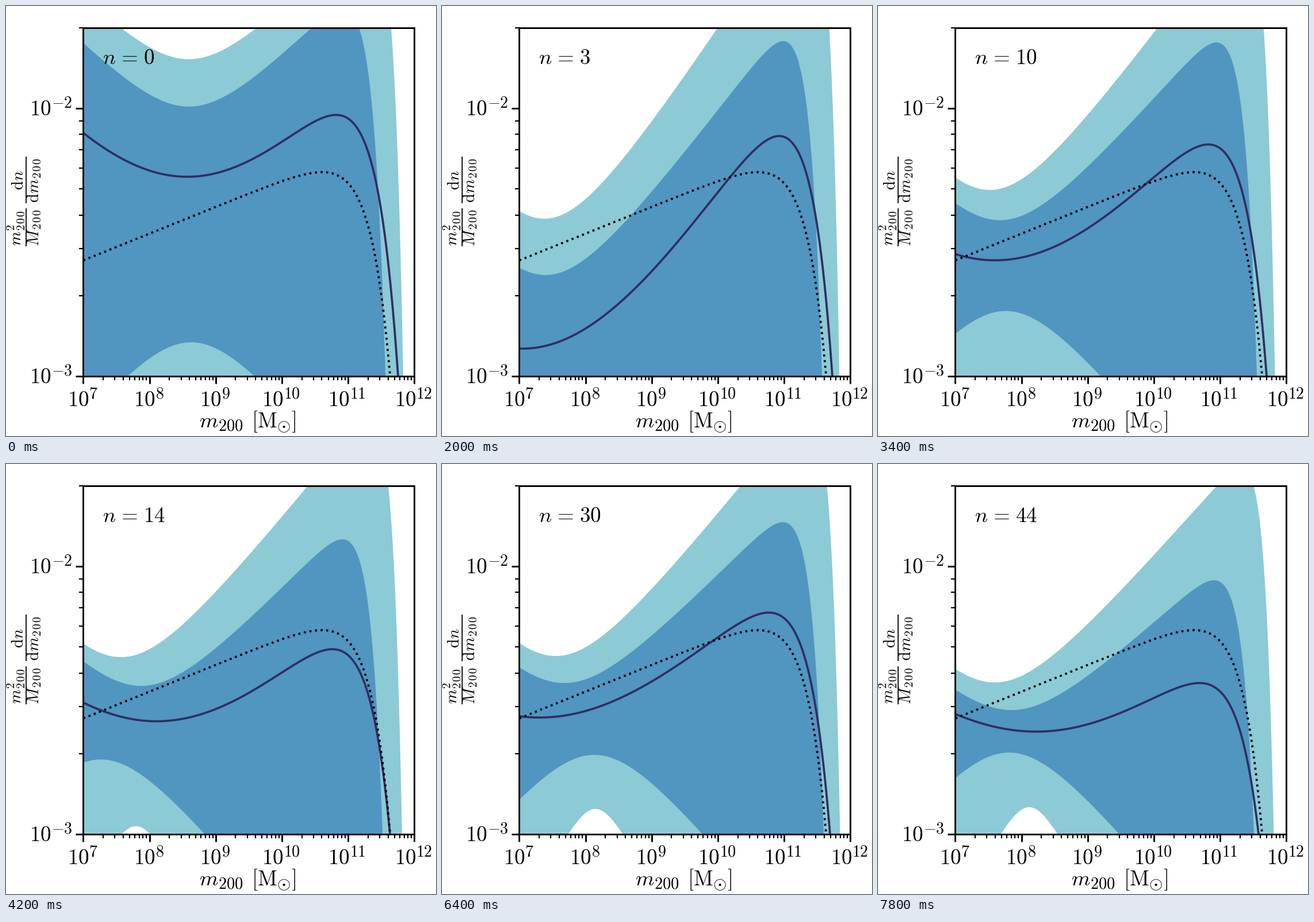
A matplotlib script for the animation above (8 s loop, 748 by 748 pixels).

```python
import numpy as np
import matplotlib.pyplot as plt
from matplotlib.animation import FuncAnimation
from matplotlib.patches import Polygon, Rectangle

SIZE = 748
FRAMES = 40
HOLD = 7                     # last step that still shows n = 0
PT = 0.72                    # points per pixel at 100 dpi
LEFT, RIGHT, TOP, BOTTOM = 134.4, 710.4, 38.2, 643.7
DEC_X = (RIGHT - LEFT) / 5
DEC_Y = (BOTTOM - TOP) / np.log10(20)
LIGHT, DARK, LINE = "#8ccad5", "#5195c1", "#302e62"
XS = np.linspace(LEFT, 700, 900)

plt.rcParams["mathtext.fontset"] = "cm"
fig = plt.figure(figsize=(SIZE / 100, SIZE / 100), dpi=100, facecolor="white")
ax = fig.add_axes([0, 0, 1, 1])
ax.set(xlim=(0, SIZE), ylim=(SIZE, 0))
ax.axis("off")


# --- Curve rules -----------------------------------------------------------
def bend(x, center, width):
    """Hyperbola: flat at the center, slope one far away from it."""
    return np.hypot(x - center, width) - width


def rise(x, center, level, slope, width, edge, rate):
    """Valley that climbs to the right and is cut off exponentially at edge."""
    def base(v):
        return level - slope * bend(v, center, width)
    cut = (BOTTOM - base(edge)) * np.exp(rate * (x - edge))
    return np.minimum(base(x) + cut, 800)


def hump(x, center, level, slope, width):
    return np.minimum(level + slope * bend(x, center, width), 800)


# Per step: valley x, valley y, slope (and right edge) of each rising curve,
# then the tops of the two lower humps.
steps, states = [], []


def state(step, median, inner, outer, low, gap=(226, 680)):
    steps.append(step)
    states.append(median + inner + outer + low + gap)


state(HOLD, (315, 297, 1.52, 682), (318, 175, 1.04, 660), (318, 92.5, 1.03),
      (322, 585))
state(10, (140, 596, 1.8, 679), (180, 468, 1.35, 661), (178, 370, 1.55),
      (290, 690))
state(14, (160, 438.5, 1.47, 682), (195, 362.5, 1.24, 662), (190, 308, 1.46),
      (265, 543))
state(21, (262, 447.5, 1.25, 668), (235, 386, 1.06, 655), (200, 336, 1.26),
      (165, 514), (226, 630))
state(32, (170, 441, 1.09, 675), (213, 381, 1.04, 664), (198, 334, 1.27),
      (265, 506), (267, 600))
state(39, (275, 465.5, 0.98, 662), (232, 428, 0.93, 654), (203, 380, 1.16),
      (228, 502), (263, 597))


def curves(i):
    p = [np.interp(i, steps, column) for column in zip(*states)]
    median, inner, outer, low, gap = p[:4], p[4:8], p[8:11], p[11:13], p[13:]
    outer_edge = 690.5 + 0.4 * (inner[3] - 659)
    return (rise(XS, *median[:3], 300, median[3], 0.0255),
            rise(XS, *inner[:3], 105, inner[3], 0.048),
            rise(XS, *outer, 105, outer_edge, 0.065),
            hump(XS, *low, 1.25, 105),
            hump(XS, *gap, 2, 40))


def band(upper, lower):
    return np.column_stack([np.r_[XS, XS[::-1]], np.r_[upper, lower[::-1]]])


# --- Drawing helpers -------------------------------------------------------
def label(x, y, tex, size, rotation=0):
    return ax.text(x, y, f"${tex}$", fontsize=size * PT, rotation=rotation,
                   ha="left", va="baseline", rotation_mode="anchor", zorder=6)


def stroke(xs, ys, width, color="black", **style):
    return ax.plot(xs, ys, color=color, lw=width * PT, **style)[0]


def power(x, y, exponent):
    label(x, y, "10", 37)
    label(x + 37.5, y - 13.4, exponent, 28)


def tick(x, y, dx, dy, major):
    length, width = (13, 2.9) if major else (7.4, 2.2)
    stroke([x, x + dx * length], [y, y + dy * length], width,
           solid_capstyle="butt", zorder=5)


# --- Frame, ticks and tick labels ------------------------------------------
frame = Rectangle((LEFT, TOP), RIGHT - LEFT, BOTTOM - TOP, fill=False,
                  ec="black", lw=2.9 * PT, zorder=5)
ax.add_patch(frame)
for d in range(6):
    x = LEFT + d * DEC_X
    tick(x, BOTTOM, 0, 1, True)
    power(x - 27.4 - 7.4 * (d > 2), 696, str(7 + d))
    for m in range(2, 10 if d < 5 else 2):
        tick(x + DEC_X * np.log10(m), BOTTOM, 0, 1, False)
for d in range(2):
    y = BOTTOM - d * DEC_Y
    tick(LEFT, y, -1, 0, True)
    power(41.5, y + 12, f"-{3 - d}")
    for m in range(2, 10 if d == 0 else 3):
        tick(LEFT, y - DEC_Y * np.log10(m), -1, 0, False)

# Horizontal axis title
for x, y, tex, size in [
        (336, 733, "m", 37), (369, 738.5, "200", 28.5), (427, 733, "[", 37),
        (437.5, 733, r"\mathrm{M}", 37), (471.5, 739, r"\odot", 30),
        (496, 733, "]", 37)]:
    label(x, y, tex, size)

# Vertical axis title: two small fractions
SUB = r"2\hspace{0.14}0\hspace{0.14}0"
for x, y, tex, size in [
        (26, 417, "m", 28), (15, 391, "2", 20), (33.5, 391, SUB, 20),
        (57.5, 418, "M", 28), (61.5, 389, SUB, 20),
        (30.5, 320, r"\mathrm{d}", 28), (30.5, 304, "n", 28),
        (57.5, 342, r"\mathrm{d}", 28), (57.5, 326, "m", 28),
        (61.5, 300, SUB, 20)]:
    label(x, y, tex, size, 90)
for y0, y1 in [(418, 351.5), (342.5, 262)]:
    stroke([35.5, 35.5], [y0, y1], 1.8, solid_capstyle="butt")

# --- Plotted shapes --------------------------------------------------------
outer_fill = Polygon([(0, 0), (1, 1), (1, 0)], fc=LIGHT, ec="none", zorder=1)
inner_fill = Polygon([(0, 0), (1, 1), (1, 0)], fc=DARK, ec="none", zorder=2)
for shape in (outer_fill, inner_fill):
    ax.add_patch(shape)
median_line = stroke([], [], 3.7, LINE, zorder=3)
fixed = 442.5 - 0.404 * (XS - LEFT) + 415 * np.exp(0.0285 * (XS - 668))
dotted = stroke(XS, fixed, 3.7, ls=":", zorder=4)
for item in (outer_fill, inner_fill, median_line, dotted):
    item.set_clip_path(frame)
counter = label(168, 101.3, "n", 37)


def draw(i):
    median, inner, outer, low, gap = curves(i)
    outer_fill.set_xy(band(outer, gap))
    inner_fill.set_xy(band(inner, low))
    median_line.set_data(XS, median)
    # counts by one up to 20, then by two
    n = max(0, i - HOLD) + max(0, i - HOLD - 20)
    counter.set_text(rf"$n\hspace{{0.117}}=\hspace{{0.117}}{n}$")
    return outer_fill, inner_fill, median_line, counter


anim = FuncAnimation(fig, draw, frames=FRAMES, init_func=lambda: draw(0),
                     interval=200, repeat=True, repeat_delay=0, blit=False)
plt.show()
```
